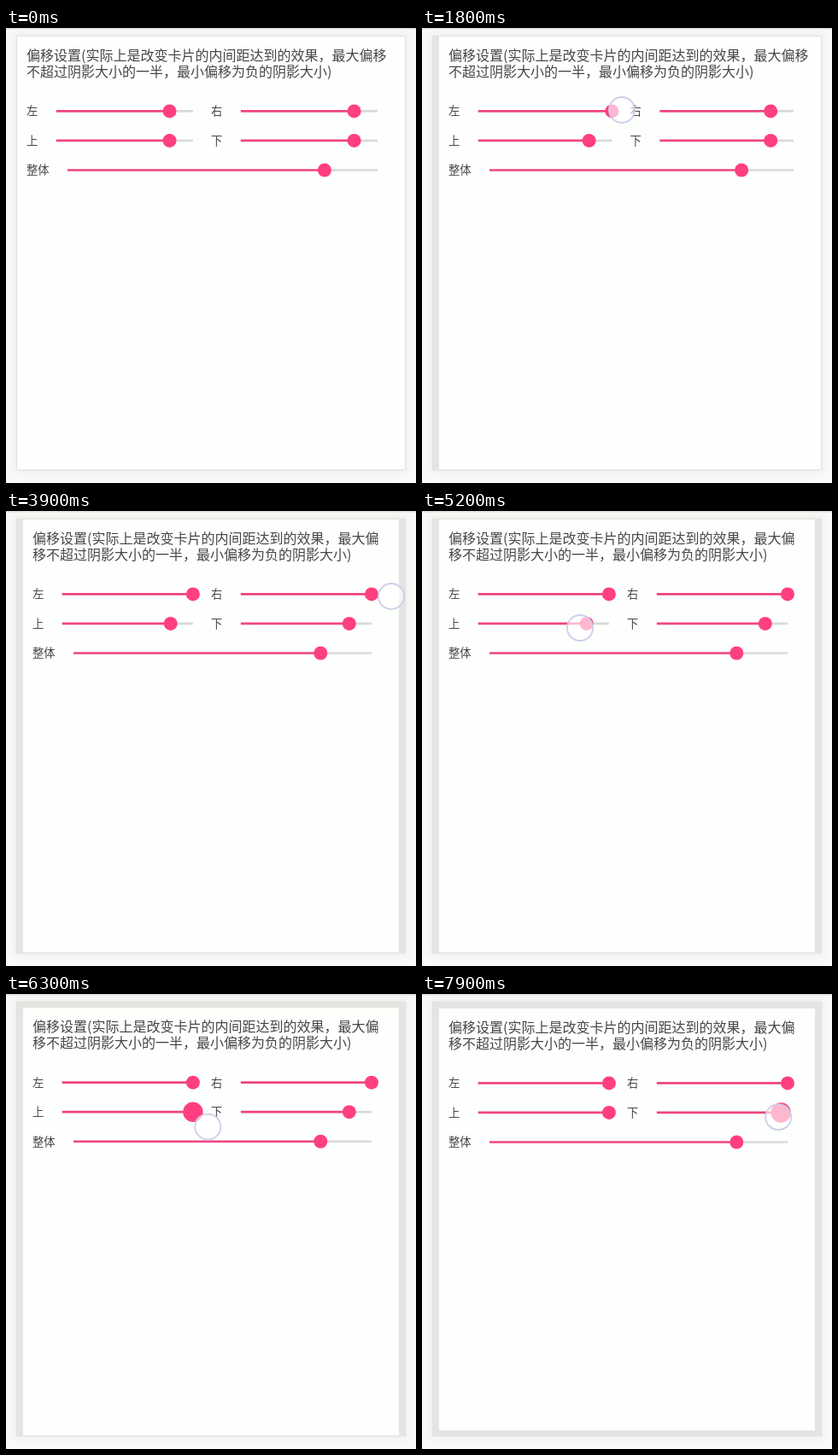
Write an HTML page that moves like this. It is 480 px wide and 533 px high and loops after 8000 ms.

```html
<!DOCTYPE html>
<html lang="zh-CN">
<head>
<meta charset="utf-8">
<style>
html, body { margin: 0; width: 100%; height: 100%; overflow: hidden; background: #fafbf9; }
svg { display: block; width: 100%; height: 100%; }
text { font-family: "Noto Sans CJK SC", "Noto Sans CJK", sans-serif; fill: #454645; }
.title { font-size: 16px; }
.label { font-size: 13.3px; }
line { stroke-width: 2.7; }
.rest { stroke: #d9dad8; }
.active { stroke: #f0447f; }
.thumb { fill: #ff3f80; }
</style>
</head>
<body>
<svg viewBox="0 0 480 533">
  <defs>
    <filter id="soft" x="-10%" y="-10%" width="120%" height="120%"><feGaussianBlur stdDeviation="6"/></filter>
    <clipPath id="frame"><rect x="11" y="1.5" width="458" height="517"/></clipPath>
  </defs>
  <rect x="9" y="4" width="462" height="518" fill="#eff1ee" filter="url(#soft)"/>
  <rect width="480" height="1.5" fill="#dfe0de"/>
  <rect x="11.5" y="8.5" width="457" height="510" rx="2" fill="#e3e5e2"/>
  <rect id="card" fill="#fdfffc" clip-path="url(#frame)"/>
  <g id="content"></g>
  <circle id="ring" r="15" fill="#fff" fill-opacity=".62" stroke="#cdcee8" stroke-width="1.8"/>
</svg>
<script>
const REST = 0.829, RANGE = 41, LOOP = 8000;
const THUMB_LAG = 50, LAYOUT_LAG = 90;
const TITLE = '偏移设置(实际上是改变卡片的内间距达到的效果，最大偏移不超过阴影大小的一半，最小偏移为负的阴影大小)';
const TITLE_WIDTH = 421.5;

// Pointer moves: start ms, end ms, x, y; it rests in between
const START = [191, 98];
const moves = [
  [500, 800, 234, 96],
  [1800, 2000, 215, 112],
  [2400, 2800, 419, 96],
  [3000, 3300, 451, 100],
  [3900, 4500, 231, 107],
  [4900, 5200, 185, 137],
  [5200, 5480, 141, 138],
  [5480, 5560, 150, 139],
  [5800, 6570, 270, 162],
  [7100, 7350, 402, 134],
  [7350, 7550, 440, 138],
  [7550, 8000, 414, 145]
];

const clamp = v => Math.max(0, Math.min(1, v));
const ease = p => p * p * (3 - 2 * p);

function pointer(t) {
  return moves.reduce(([x, y], [from, to, nx, ny]) => {
    const p = ease(clamp((t - from) / (to - from)));
    return [x + (nx - x) * p, y + (ny - y) * p];
  }, START);
}

const byId = id => document.getElementById(id);
const content = byId('content'), card = byId('card'), ring = byId('ring');

function set(el, attrs) {
  for (const k in attrs) el.setAttribute(k, attrs[k]);
}

function add(tag, cls, text = '') {
  const el = document.createElementNS('http://www.w3.org/2000/svg', tag);
  el.setAttribute('class', cls);
  el.textContent = text;
  return content.appendChild(el);
}

const lines = [add('text', 'title'), add('text', 'title')];

function slider(text, row, col, down = Infinity, up = Infinity) {
  return {
    row, col, down, up, wide: row === 2,
    label: add('text', 'label', text),
    rest: add('line', 'rest'), active: add('line', 'active'), thumb: add('circle', 'thumb')
  };
}

const left = slider('左', 0, 0, 500, 1050), right = slider('右', 0, 1, 3000, 3450);
const top_ = slider('上', 1, 0, 5200, 6650), bottom = slider('下', 1, 1, 7350);
const sliders = [left, right, top_, bottom, slider('整体', 2, 0)];

// A pressed thumb follows the pointer and stays where it was released
function value(s, t) {
  if (t <= s.down) return REST;
  const [x] = pointer(Math.min(t, s.up));
  return clamp((x - (s.col ? 275 : 65.5)) / 153.5);
}

const radius = (s, t) => 8 + 3.7 * (clamp((t - s.down) / 150) - clamp((t - s.up) / 200));

function draw(t) {
  const [l, r, top, b] = [left, right, top_, bottom].map(s => (value(s, t - LAYOUT_LAG) - REST) * RANGE);
  set(card, { x: 13 + l, y: 10 + top, width: 454 - l - r, height: 507 - top - b });

  const x0 = 24 + l, x1 = 435 - r, mid = (x0 + x1) / 2;
  const cut = x1 + 21 - x0 < TITLE_WIDTH ? 26 : 27;
  [TITLE.slice(0, cut), TITLE.slice(cut)].forEach((text, i) => {
    lines[i].textContent = text;
    set(lines[i], { x: x0, y: 37.9 + 18.7 * i + top });
  });

  for (const s of sliders) {
    const y = 97.4 + 34.55 * s.row + top;
    const labelX = s.col ? mid + 10.6 : x0;
    const start = labelX + (s.wide ? 48 : 34.7), end = s.col || s.wide ? x1 : mid - 10.6;
    const x = start + (end - start) * value(s, t - THUMB_LAG);
    set(s.label, { x: labelX, y: y + 4.9 });
    set(s.rest, { x1: x, x2: end, y1: y, y2: y });
    set(s.active, { x1: start, x2: x, y1: y, y2: y });
    set(s.thumb, { cx: x, cy: y, r: radius(s, t) });
  }

  const [cx, cy] = pointer(t);
  set(ring, { cx, cy, visibility: t < moves[0][0] ? 'hidden' : 'visible' });
}

function tick() {
  draw(performance.now() % LOOP);
  requestAnimationFrame(tick);
}
tick();
</script>
</body>
</html>
```
